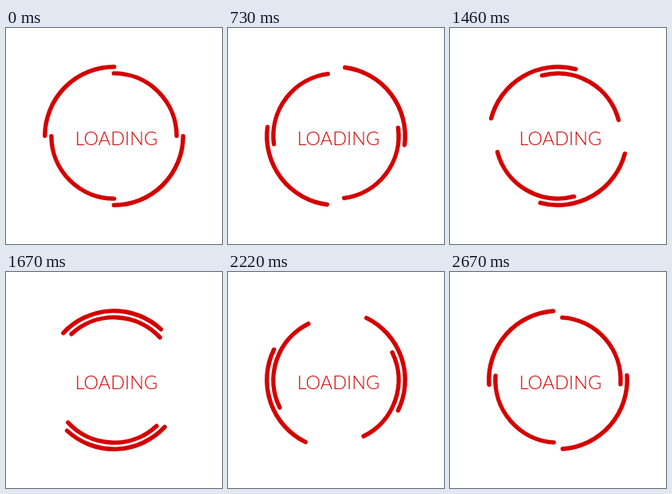
Animation of 271x271 px, one loop 2700 ms. Source, as an HTML page:

```html
<!DOCTYPE html>
<html>
<head>
<meta charset="utf-8">
<style>
html, body { margin: 0; height: 100%; overflow: hidden; background: #fff; }
svg { display: block; width: 100%; height: 100%; }
circle { fill: none; stroke: #d40000; stroke-width: 2; stroke-linecap: round; }
text { font: 300 23.5px Lato, sans-serif; fill: #d40000; text-anchor: middle; }
</style>
</head>
<body>
<svg viewBox="0 0 271 271">
  <g transform="translate(135.5 135.5) scale(2.71)">
    <circle id="outer" r="32" pathLength="4" stroke-dasharray="1"/>
    <circle id="inner" r="29" pathLength="4" stroke-dasharray="1" stroke-dashoffset="1"/>
  </g>
  <text x="138.5" y="146.5">LOADING</text>
</svg>
<script>
const LOOP = 2700;
const outer = document.getElementById('outer');
const inner = document.getElementById('inner');

function draw() {
  const angle = performance.now() % LOOP / LOOP * 360;
  outer.setAttribute('transform', `rotate(${angle})`);
  inner.setAttribute('transform', `rotate(${-angle})`);
  requestAnimationFrame(draw);
}
draw();
</script>
</body>
</html>
```
